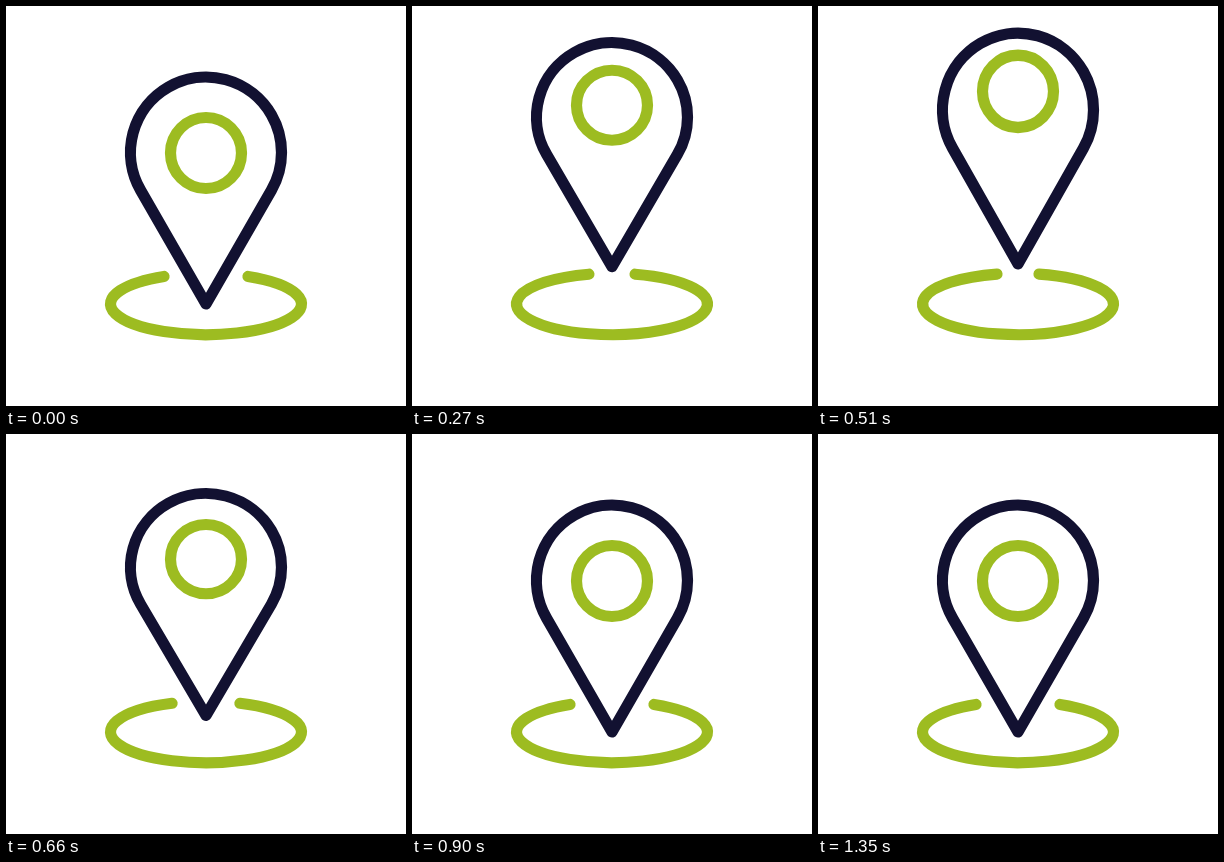
These frames come from a looping animation (400x400 px, 3410 ms). An HTML page with a canvas:

```html
<!DOCTYPE html>
<html lang="en">
<head>
<meta charset="utf-8">
<title>Bouncing map pin</title>
<style>
html, body { margin: 0; width: 100%; height: 100%; overflow: hidden; background: #fff; }
canvas { display: block; width: 100vw; height: 100vh; }
</style>
</head>
<body>
<canvas id="stage"></canvas>
<script>
const canvas = document.getElementById('stage');
const ctx = canvas.getContext('2d');
const SIZE = 400, LOOP = 3410, STEP = 30, APEX = 450, END = 1350;
const CENTER = 200, GROUND = 298;
const NAVY = '#121131', GREEN = '#9dbc21', STROKE = 11.2;
const dpr = window.devicePixelRatio || 1;
canvas.width = canvas.height = SIZE * dpr;

const TIP = { rest: GROUND, dip: GROUND, peak: 257.3, low: GROUND, launch: 117, land: 700, power: 4 };
const STRETCH = { rest: 1, dip: 0.9, peak: 1.017, low: 0.902, launch: 90, land: 750, power: 2 };
const LIFT = { rest: 151, dip: 137, peak: 170, low: 140.5, launch: 140, land: 750, power: 3 };

const mix = (a, b, u) => a + (b - a) * u;
const smooth = u => u * u * (3 - 2 * u);
const easeOut = (u, power) => 1 - (1 - u) ** power;
const spring = ms => Math.exp(-ms / 110) * Math.cos(Math.PI * ms / 300);

// Crouch, shoot up, drop, then swing back to rest
function bounce(t, { rest, dip, peak, low, launch, land, power }) {
  if (t >= END) return rest;
  if (t < launch) return mix(rest, dip, smooth(t / launch));
  if (t < APEX) return mix(dip, peak, easeOut((t - launch) / (APEX - launch), power));
  if (t < land) return mix(peak, low, ((t - APEX) / (land - APEX)) ** 3);
  return mix(rest, low, spring(t - land));
}

function stroke(color) {
  ctx.strokeStyle = color;
  ctx.stroke();
}

function drawRing(gap) {
  const rx = 95.5, ry = 30.7, side = Math.acos(gap / rx);
  ctx.beginPath();
  ctx.ellipse(CENTER, GROUND, rx, ry, 0, -side, Math.PI + side);
  stroke(GREEN);
}

function drawPin(tip, stretch, lift) {
  const r = 75.5, height = 151.5, side = Math.acos(r / height);
  ctx.save();
  ctx.translate(CENTER, tip);
  ctx.scale(1, stretch);
  ctx.beginPath();
  ctx.moveTo(0, 0);
  ctx.arc(0, -height, r, Math.PI / 2 + side, Math.PI / 2 - side);
  ctx.closePath();
  stroke(NAVY);
  ctx.beginPath();
  ctx.arc(0, -lift, 35.5, 0, Math.PI * 2);
  stroke(GREEN);
  ctx.restore();
}

function draw(now) {
  const t = Math.floor(now % LOOP / STEP) * STEP;
  const tip = bounce(t, TIP), stretch = bounce(t, STRETCH), lift = bounce(t, LIFT);
  ctx.setTransform(dpr, 0, 0, dpr, 0, 0);
  ctx.fillStyle = '#fff';
  ctx.fillRect(0, 0, SIZE, SIZE);
  ctx.lineWidth = STROKE;
  ctx.lineCap = ctx.lineJoin = 'round';
  // The ring closes as the pin rises and opens when it is squashed
  drawRing(42 - 0.515 * (GROUND - tip) + 20 * (1 - stretch));
  drawPin(tip, stretch, lift);
}

const start = performance.now();
function loop() {
  draw(performance.now() - start);
  requestAnimationFrame(loop);
}
loop();
</script>
</body>
</html>
```
